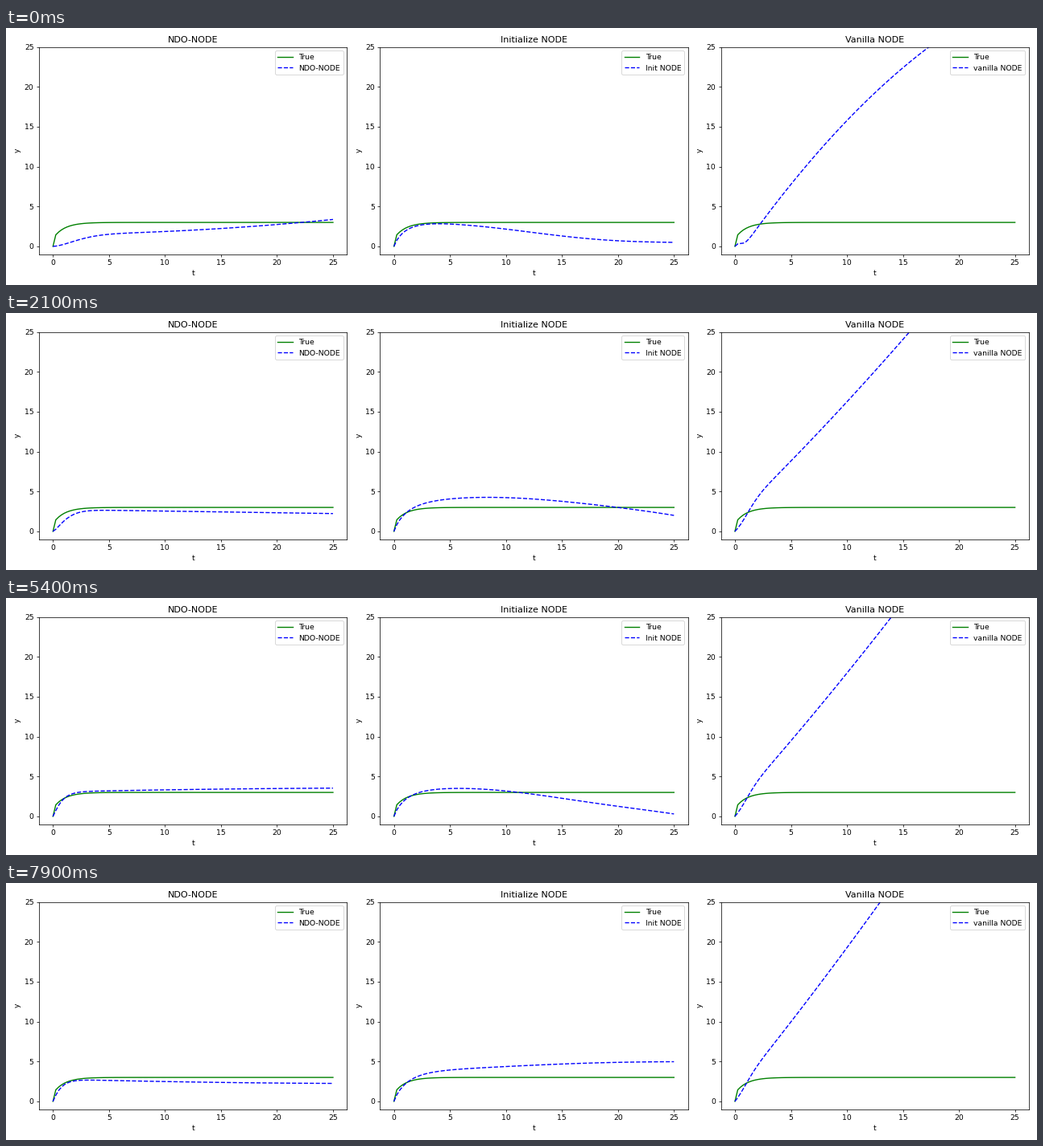
These frames come from a looping animation (1280 by 320 pixels, 8 s). A matplotlib script:

```python
import numpy as np
import matplotlib.pyplot as plt
from matplotlib.animation import FuncAnimation

DPI = 66.6667
FRAMES, INTERVAL = 80, 100

plt.rcParams["font.family"] = "DejaVu Sans"
plt.rcParams["font.size"] = 10

T = np.linspace(0, 25, 100)
TURNS = [0, 8, 21, 34, 44, 65, 79]  # steps where the fits change direction


def ease(step, steps, values):
    """Move smoothly from one value to the next as training advances."""
    i = np.clip(np.searchsorted(steps, step, side="right") - 1, 0, len(steps) - 2)
    u = (step - steps[i]) / (steps[i + 1] - steps[i])
    return values[i] + (values[i + 1] - values[i]) * u * u * (3 - 2 * u)


def fit(level, end, tau, power, bow, sway=0):
    """A quick rise to level, then a bent path that finishes at end."""
    u = T / T[-1]
    rise = 1 - np.exp(-(T / tau) ** power)
    return (level * rise + (end - level) * u
            + bow * 4 * u * (1 - u) + sway * np.sin(2 * np.pi * u))


def ndo_fit(step):
    level = ease(step, TURNS, [1.5, 3.3, 2.75, 2.8, 3.08, 3.03, 2.8])
    end = ease(step, TURNS, [3.37, 4.57, 2.23, 5.42, 3.37, 3.73, 2.25])
    bow = ease(step, TURNS, [-0.4, 0, 0, 0.3, 0.05, 0.1, -0.1])
    tau = 0.7 + 2.07 * np.exp(-step / 18)
    power = 1 + 0.65 * np.exp(-step / 35)
    return fit(level, end, tau, power, bow)


def init_fit(step):
    end = ease(step, TURNS, [0.5, 6.48, 2, -0.9, -0.82, 1.6, 4.97])
    bow = ease(step, TURNS, [-0.15, 0.25, 1.35, 0.8, 0.9, 1.1, 0.2])
    level = 3.2 + 0.1 * end
    return fit(level, end, 0.33 * level, 0.9, bow, sway=0.3 - 0.07 * end)


def vanilla_fit(step):
    steps = [0, 8, 21, 79]
    level = np.interp(step, steps, [-1.6, -0.35, 1.8, 1.1])
    end = np.interp(step, steps, [31.5, 31.8, 40.9, 49.7])
    bow = np.interp(step, steps, [4.3, 1.34, -1.25, -1.33])
    return fit(level, end, 1.1 + 0.25 * level, 2, bow)


PANELS = [
    ("NDO-NODE", "NDO-NODE", ndo_fit),
    ("Initialize NODE", "Init NODE", init_fit),
    ("Vanilla NODE", "vanilla NODE", vanilla_fit),
]

truth = 3 - 2 * np.exp(-T)
truth[0] = 0

fig, axes = plt.subplots(1, 3, figsize=(19.2, 4.8), dpi=DPI, facecolor="white")


def make_panel(ax, title, label, curve):
    ax.plot(T, truth, color="green", label="True")
    line, = ax.plot(T, curve(0), "--", color="blue", label=label)
    ax.set(title=title, xlabel="t", ylabel="y",
           xlim=(-1.25, 26.25), ylim=(-1, 25),
           xticks=range(0, 26, 5), yticks=range(0, 26, 5))
    ax.legend(loc="upper right")
    return line


lines = [make_panel(ax, *panel) for ax, panel in zip(axes, PANELS)]
fig.tight_layout()


def update(step):
    for line, (_, _, curve) in zip(lines, PANELS):
        line.set_ydata(curve(step))
    return lines


anim = FuncAnimation(fig, update, frames=FRAMES, interval=INTERVAL,
                     repeat=True, repeat_delay=0, blit=False)
plt.show()
```
